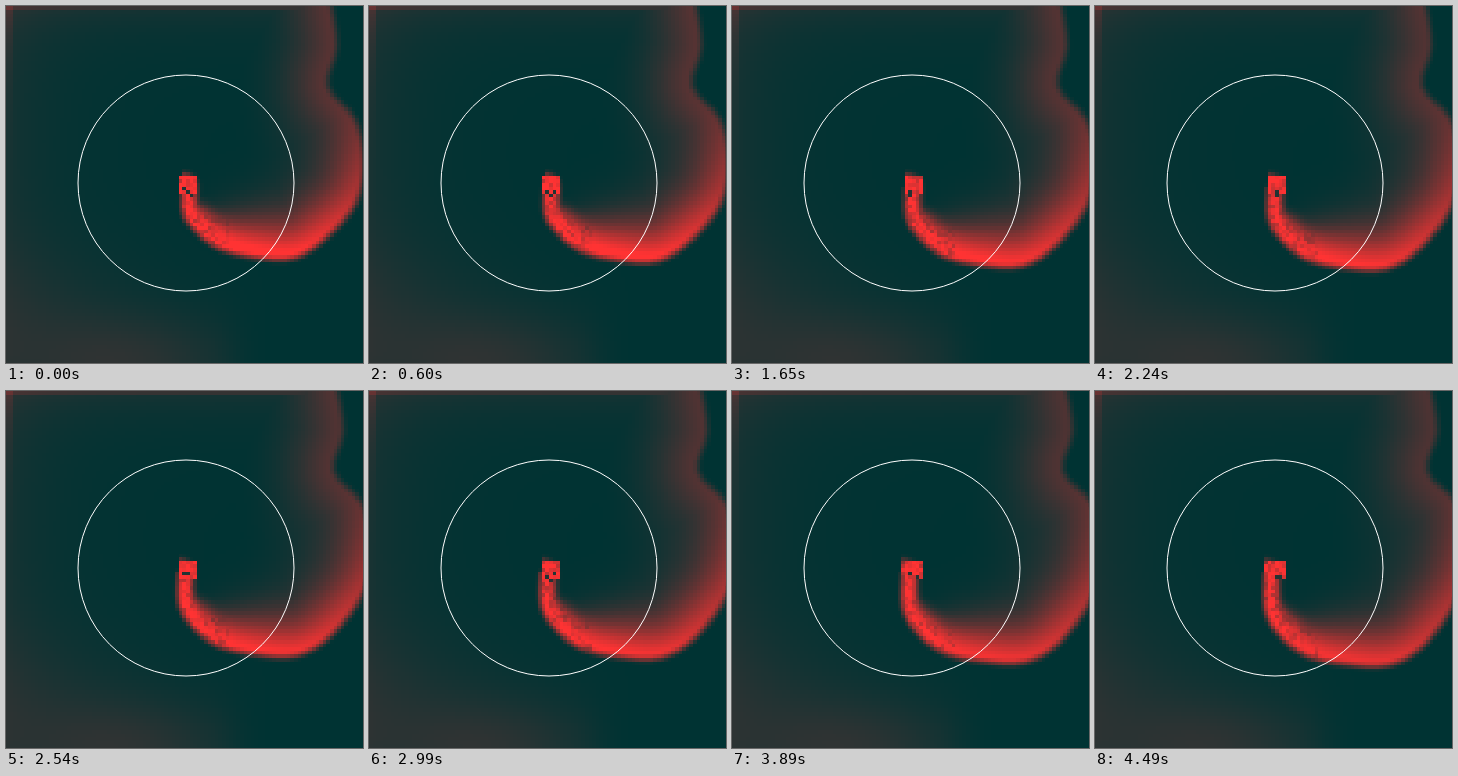
Write an HTML page with a canvas that moves like this. It is 357 px wide and 357 px high and loops after 4.59 s.

```html
<!DOCTYPE html>
<html lang="en">
<head>
<meta charset="utf-8">
<title>Red plume</title>
<style>
  html, body { margin: 0; width: 100%; height: 100%; overflow: hidden; background: #033; }
  canvas { display: block; }
</style>
</head>
<body>
<canvas width="357" height="357"></canvas>
<script>
const ctx = document.querySelector('canvas').getContext('2d');
const CELL = 3.6, TOP = -3, GRID = 100, LOOP = 4590;

// Key points on the outer edge of the plume, from the emitter round to the top
const EDGE = [
  [177, 182], [177, 206], [188, 223], [212, 242], [248, 251], [288, 252], [320, 232],
  [350, 197], [358, 155], [349, 113], [322, 80], [331, 40], [324, -8]
];

const clamp = (v, lo, hi) => Math.min(hi, Math.max(lo, v));
const bell = (d, w) => Math.exp(-((d / w) ** 2));
const smooth = (a, b, v) => {
  const t = clamp((v - a) / (b - a), 0, 1);
  return t * t * (3 - 2 * t);
};
const rand = (a, b, c) => {
  const n = Math.sin(a * 12.9898 + b * 78.233 + c * 37.719) * 43758.5453;
  return n - Math.floor(n);
};
const spline = (a, b, c, d, t) =>
  b + t / 2 * (c - a + t * (2 * a - 5 * b + 4 * c - d + t * (3 * (b - c) + d - a)));

// The picture updates in three runs of even steps
const run = (from, gap, count) => Array.from({ length: count }, (_, i) => from + gap * i);
const times = [...run(0, 300, 5), ...run(1350, 295, 6), ...run(2990, 300, 6)];

function haze(x, y, col, row) {
  let v = 22 * Math.exp(-x / 50)
    + 24 * Math.exp(-y / 25) * (1 - smooth(290, 330, x))
    + 40 * bell(x - 120, 110) * bell(357 - y, 50) * (1 - smooth(205, 265, x))
    + 17 * bell(x, 130) * bell(300 - y, 70);
  if (row < 2) v += 30 * (1 - smooth(310, 330, x));
  if (col < 2) v += 32 * Math.exp(-y / 60);
  return v;
}

// The plume spreads sideways and its lower part sinks as s goes from 0 to 1
function shape(s) {
  const keys = EDGE.map(([x, y]) => [
    x + 0.12 * (x - 235) * s,
    y + 22 * smooth(170, 240, y) * s
  ]);
  const last = keys.length - 1, key = i => keys[clamp(i, 0, last)];
  const pts = [], path = new Path2D();
  for (let k = 0; k <= last; k += 0.25) {
    const i = Math.floor(k), u = k / last, grow = smooth(0, 0.4, u);
    const [x, y] = [0, 1].map(n =>
      spline(key(i - 1)[n], key(i)[n], key(i + 1)[n], key(i + 2)[n], k - i));
    pts.push({
      x, y,
      strength: (70 + 215 * (1 - smooth(0.3, 0.85, u))) * (1 - 0.14 * s * grow),
      reach: 14 + 24 * grow,
      power: 4 - 2.4 * grow
    });
    path.lineTo(x, y);
  }
  path.lineTo(pts[0].x, -8);
  return { pts, path };
}

function plume({ pts, path }, x, y) {
  let near = 1e9, glow = 0;
  for (let i = 1; i < pts.length; i++) {
    const p = pts[i - 1], q = pts[i], dx = q.x - p.x, dy = q.y - p.y;
    const t = clamp(((x - p.x) * dx + (y - p.y) * dy) / (dx * dx + dy * dy), 0, 1);
    const d = Math.hypot(x - p.x - dx * t, y - p.y - dy * t);
    const mix = name => p[name] + (q[name] - p[name]) * t;
    near = Math.min(near, d);
    glow = Math.max(glow, mix('strength') * Math.exp(-((d / mix('reach')) ** mix('power'))));
  }
  const depth = ctx.isPointInPath(path, x, y) ? near : -near;
  return (glow + 20 * smooth(230, 320, x)) * smooth(-6, 6, depth);
}

function draw(step) {
  const form = shape(times[step] / times[times.length - 1]);
  // A few empty cells flicker in the emitter
  const holes = [0, 1, 2].map(i =>
    [49 + Math.floor(3 * rand(step, i, 1)), 51 + Math.floor(3 * rand(step, i, 2))].join());
  for (let row = 0; row < GRID; row++) {
    for (let col = 0; col < GRID; col++) {
      const x = (col + 0.5) * CELL, y = (row + 0.5) * CELL + TOP;
      const inHead = Math.abs(col - 50) < 3 && Math.abs(row - 50) < 3;
      let v = inHead ? 255 : Math.max(haze(x, y, col, row), plume(form, x, y));
      if (x < 225) v = Math.min(v, 255) * (1 - 0.3 * smooth(80, 200, v) * rand(col, row, step) ** 3);
      if (holes.includes([col, row].join())) v = 35;
      ctx.fillStyle = `rgb(${Math.round(clamp(v, 0, 255))},51,51)`;
      const left = Math.round(col * CELL), top = Math.round(row * CELL + TOP);
      ctx.fillRect(left, top, Math.round((col + 1) * CELL) - left, Math.round((row + 1) * CELL + TOP) - top);
    }
  }
  ctx.strokeStyle = '#fff';
  ctx.lineWidth = 1;
  ctx.beginPath();
  ctx.arc(180, 177, 108, 0, Math.PI * 2);
  ctx.stroke();
}

let shown = -1;
const start = performance.now();
function tick() {
  const t = (performance.now() - start) % LOOP;
  const step = times.filter(at => at <= t).length - 1;
  if (step !== shown) draw(shown = step);
  requestAnimationFrame(tick);
}
tick();
</script>
</body>
</html>
```
